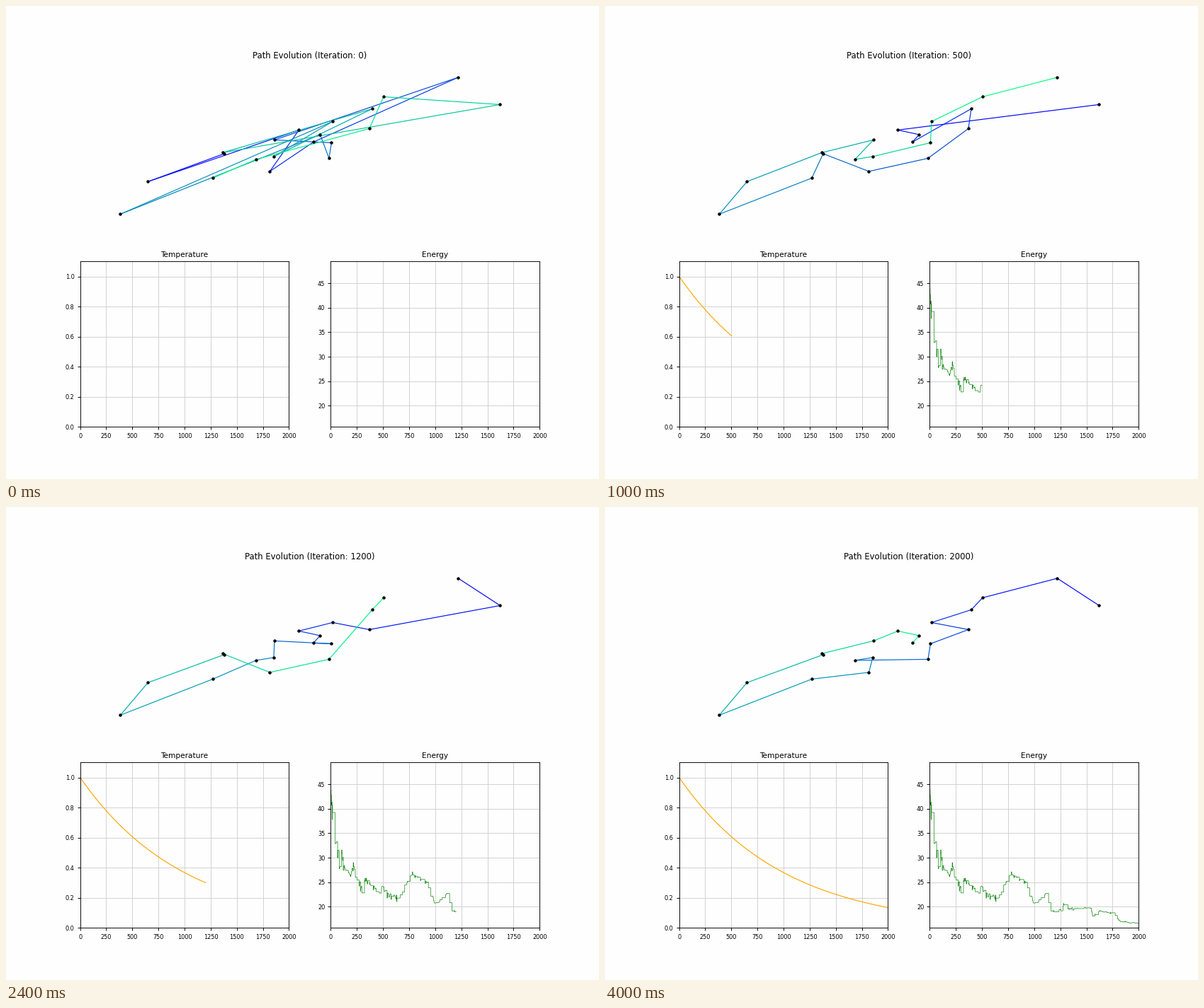
A matplotlib script that plays this animation: 837x669 px, repeating every 4100 ms.

```python
import numpy as np
import matplotlib.pyplot as plt
from matplotlib.animation import FuncAnimation
from matplotlib.collections import LineCollection

W, H, DPI = 837, 669, 83.7
FRAMES, STEP = 41, 50
TOTAL = 2000
PAPER = "#fefefe"
plt.rcParams["font.family"] = "DejaVu Sans"

# Stops, named A to T from left to right, in stage pixels
STOPS = 0.4 + np.array([
    (161, 294), (200, 248), (291.5, 243), (305.5, 207), (307.5, 208.5),
    (352.5, 216.5), (372, 233.5), (377.5, 212.5), (378.5, 189), (413, 175),
    (433.5, 192), (443, 181.5), (455.5, 215), (459, 193), (460.5, 163),
    (512.5, 173), (516.5, 145), (532.5, 128), (638, 100.5), (697, 139)])

# Visiting order reached at certain steps
TOURS = {
    0: "EBJGKSINMLAOHQDTRPFC",
    6: "PONLTJMIEHCABGFDKQRS",
    10: "TJLKQPMGECABDIFHNORS",
    16: "SOLJKMNFHCIDEBAGQRPT",
    24: "STPOJLKNIHFCABEDGMQR",
    31: "SRPLONKFHMGCABEDIJQT",
    40: "TSRQOPNMFHGCABEDIJLK"}

# Turning points (iteration, energy) of the energy trend
TREND = [
    (0, 43), (18, 38), (28, 40), (34, 34), (60, 32.3), (79, 27.5),
    (100, 31), (125, 28), (196, 26.2), (222, 28.5), (242, 25.2),
    (290, 23.7), (326, 25.5), (461, 22.9), (499, 24.3), (530, 22.4),
    (650, 21.8), (780, 26.8), (925, 24.8), (950, 22.5), (1010, 20.4),
    (1125, 22.9), (1143, 19.3), (1265, 19.3), (1280, 20.5), (1320, 19.6),
    (1540, 19.7), (1560, 18), (1620, 19.1), (1755, 18.7), (1820, 17),
    (2000, 16.6)]


def tour_length(order):
    return np.hypot(*np.diff(STOPS[order], axis=0).T).sum()


def swaps_between(start, goal):
    """Orders met while swapping stops into place, shortest tour first."""
    order, orders = list(start), [list(start)]
    while order != goal:
        options = []
        for i, stop in enumerate(goal):
            if order[i] != stop:
                new = order.copy()
                j = new.index(stop)
                new[i], new[j] = new[j], new[i]
                options.append(new)
        order = min(options, key=tour_length)
        orders.append(order)
    return orders


def build_tours():
    keys = [(f, [ord(c) - 65 for c in s]) for f, s in TOURS.items()]
    tours = [keys[0][1]]
    for (f0, a), (f1, b) in zip(keys, keys[1:]):
        orders = swaps_between(a, b)
        for f in range(f0 + 1, f1 + 1):
            share = (f - f0) / (f1 - f0)
            tours.append(orders[round(share * (len(orders) - 1))])
    return tours


def build_energy(iters, temperature):
    """Follow the trend in random stairs that calm down with cooling."""
    rng = np.random.default_rng(4)
    trend = np.interp(iters, *zip(*TREND))
    noisy = trend + 0.9 * temperature ** 1.5 * rng.normal(size=iters.size)
    change = rng.random(iters.size) < 0.06 + 0.14 * temperature ** 2
    last_change = np.maximum.accumulate(np.where(change, iters, 0))
    return noisy[last_change]


iters = np.arange(TOTAL + 1)
temperature = 0.999 ** iters
energy = build_energy(iters, temperature)
tours = build_tours()

fig = plt.figure(figsize=(W / DPI, (H + 0.1) / DPI), dpi=DPI, facecolor=PAPER)
grid = fig.add_gridspec(2, 2)

route_ax = fig.add_subplot(grid[0, :])
box = route_ax.get_window_extent()
route_ax.set(xlim=(box.x0, box.x1), ylim=(H - box.y0, H - box.y1))
route_ax.axis("off")
title = route_ax.set_title("", fontsize=10, pad=5.2)
route = LineCollection([], linewidths=1, zorder=2,
                       colors=plt.cm.winter(np.linspace(0, 1, len(STOPS) - 1)))
route_ax.add_collection(route, autolim=False)
route_ax.plot(*STOPS.T, "o", color="black", ms=3, mew=0.8, zorder=3)


def add_chart(cell, name, ylim, yticks, color, width):
    ax = fig.add_subplot(cell, facecolor=PAPER)
    ax.set_title(name, fontsize=9, pad=5.2)
    ax.set(xlim=(0, TOTAL), ylim=ylim, yticks=yticks,
           xticks=range(0, TOTAL + 1, 250))
    ax.tick_params(labelsize=7)
    ax.grid(color="#d0d0d0")
    return ax.plot([], [], color=color, lw=width)[0]


temp_line = add_chart(grid[1, 0], "Temperature", (0, 1.1),
                      np.arange(6) / 5, "orange", 1)
energy_line = add_chart(grid[1, 1], "Energy", (15.67, 49.47),
                        range(20, 50, 5), "green", 0.55)


def draw(frame):
    k = frame * STEP
    title.set_text(f"Path Evolution (Iteration: {k})")
    points = STOPS[tours[frame]]
    route.set_segments(np.stack([points[:-1], points[1:]], axis=1))
    end = k + 1 if k else 0
    temp_line.set_data(iters[:end], temperature[:end])
    energy_line.set_data(iters[:end], energy[:end])
    return title, route, temp_line, energy_line


anim = FuncAnimation(fig, draw, frames=FRAMES, interval=100,
                     repeat=True, repeat_delay=0, blit=False)
plt.show()
```
